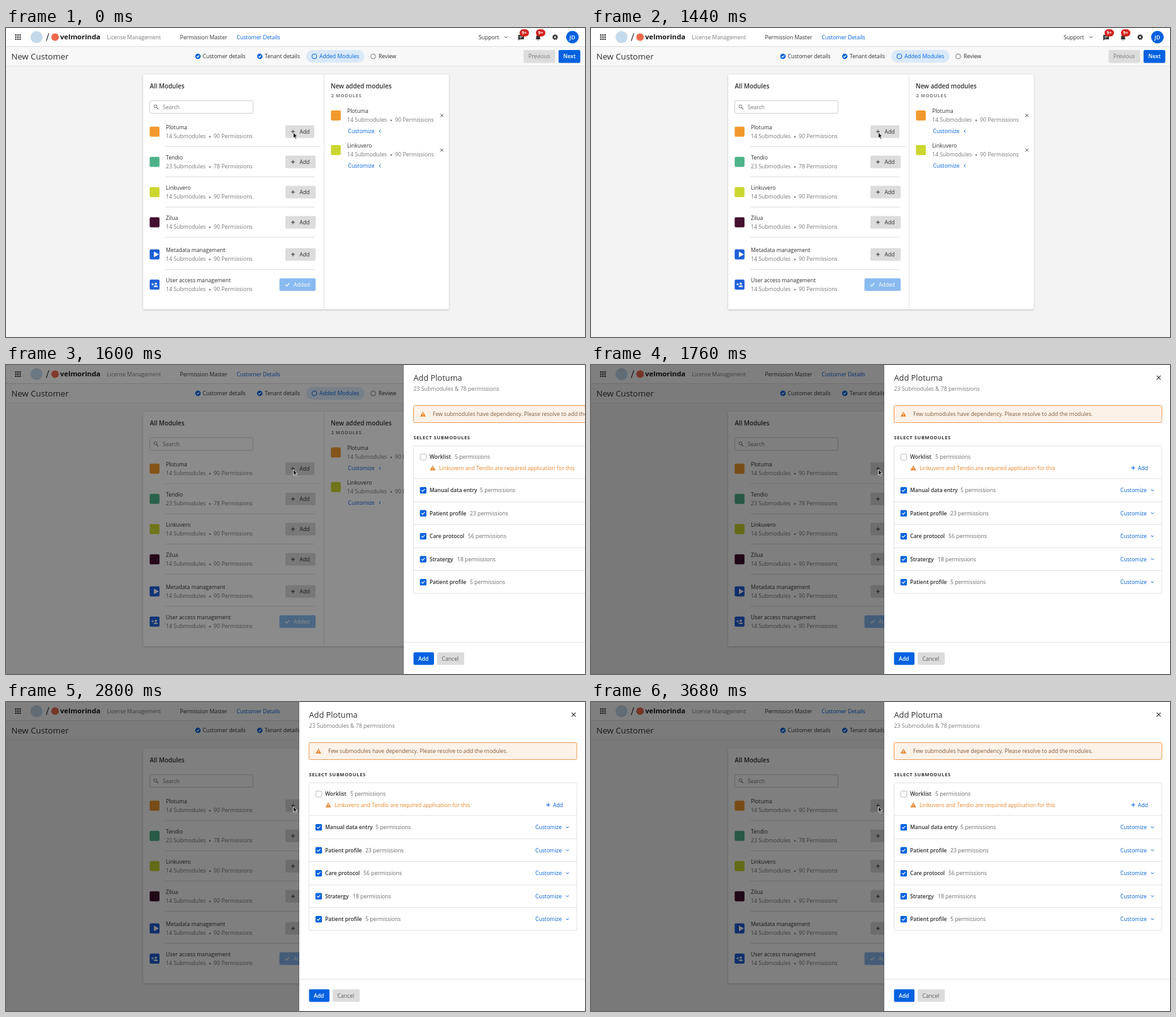
Recreate the animation shown at these times as an HTML page. Size 920 by 491 pixels, loop 3.76 s.

```html
<!DOCTYPE html>
<html lang="en">
<head>
<meta charset="utf-8">
<title>Add module</title>
<style>
  html, body { margin: 0; width: 100%; height: 100%; overflow: hidden; background: #f3f3f3; }
  svg { display: block; width: 920px; height: 491px; font-family: "Open Sans", "Noto Sans", sans-serif; }
  text { white-space: pre; }
</style>
</head>
<body>
<svg id="stage" viewBox="0 0 920 491"></svg>
<script>
const BLUE = '#0061e0', INK = '#2f2f2f', GREY = '#787878', BUTTON = '#dcdcdc', ORANGE = '#e9852d';
const LOOP = 3760, STEP = 80, PANEL_X = 466;

// Shape helpers; text is placed by its vertical centre.
const text = (x, y, str, fill = INK, size = 8.65, weight = 400, extra = '') =>
  `<text x="${x}" y="${y + size * .36}" fill="${fill}" font-size="${size}" font-weight="${weight}" ${extra}>${str}</text>`;
const box = (x, y, w, h, fill, r = 0, extra = '') =>
  `<rect x="${x}" y="${y}" width="${w}" height="${h}" rx="${r}" fill="${fill}" ${extra}/>`;
const dot = (x, y, r, fill, extra = '') => `<circle cx="${x}" cy="${y}" r="${r}" fill="${fill}" ${extra}/>`;
const line = (x, y, d, stroke, width = 1) =>
  `<path transform="translate(${x} ${y})" d="${d}" fill="none" stroke="${stroke}" stroke-width="${width}"/>`;
const solid = (x, y, d, fill, extra = '') => `<path transform="translate(${x} ${y})" d="${d}" fill="${fill}" ${extra}/>`;

const plus = (x, y, c = INK) => line(x, y, 'M-3 0H3M0-3V3', c);
const cross = (x, y, s, width) => line(x, y, `M${-s} ${-s}L${s} ${s}M${s} ${-s}L${-s} ${s}`, INK, width);
const tick = (x, y, s = 1) => line(x, y, `M${-2.6 * s} 0L${-.8 * s} ${1.9 * s}L${2.7 * s} ${-1.9 * s}`, '#fff', 1.2);
const warning = (x, y) => solid(x, y, 'M0-4L4.5 4H-4.5Z', ORANGE) + line(x, y, 'M0-1.4V1.2M0 2V3', '#fff', .9);
const caps = (x, y, str, fill) => text(x, y, str, fill, 7.4, 700, 'letter-spacing=".7"');
const counts = (x, y, subs, perms) =>
  text(x, y, subs + ' Submodules', GREY, 8.75) + dot(x + 70, y + .8, 1.3, GREY) + text(x + 76, y, perms + ' Permissions', GREY, 8.75);

function header() {
  let s = box(0, 0, 920, 30, '#fff') + box(0, 30, 920, 31, '#f8f8f8') +
    box(0, 29, 920, 1, '#dedede') + box(0, 60, 920, 1, '#e4e4e4');
  for (let i = 0; i < 9; i++) s += box(14.5 + i % 3 * 3.4, 10 + (i / 3 | 0) * 3.4, 2.2, 2.2, INK);
  s += dot(48.5, 14.5, 9.5, '#c3d9ec') + line(66, 14.5, 'M-2 6L2-6', INK, 1.2) + dot(78, 14.5, 6, '#ee6a4c') +
    text(86, 14, 'velmorinda', '#161616', 11.2, 700) +
    text(160.5, 14.5, 'License Management', GREY) + text(276.5, 14.5, 'Permission Master') +
    text(366.5, 14.5, 'Customer Details', BLUE) + text(751, 14.5, 'Support') +
    line(794.5, 14.5, 'M-2.2-1.1L0 1.1L2.2-1.1', INK) +
    solid(818.5, 15, 'M-4.5-4H4.5V3H-2.5L-4.5 5Z', INK) + line(818.5, 15, 'M-2.5-1.5H2.5M-2.5 .5H1', '#fff', .8) +
    solid(845.5, 15, 'M-4 3L-3 1.5V-1C-3-5 3-5 3-1V1.5L4 3ZM-1.2 3.7H1.2Q0 5.6-1.2 3.7Z', INK) +
    dot(872.5, 14.5, 2.5, 'none', `stroke="${INK}" stroke-width="2"`) +
    dot(872.5, 14.5, 3.8, 'none', `stroke="${INK}" stroke-width="1.3" stroke-dasharray="1.7 1.28"`);
  for (const x of [823.5, 849.5])
    s += box(x - 7.5, 2, 15, 11.5, '#d5221f', 5.7) + text(x, 7.6, '9+', '#fff', 7, 700, 'text-anchor="middle"');
  s += dot(900, 14.5, 10, BLUE) + text(900, 14.5, 'JD', '#fff', 9, 600, 'text-anchor="middle"');

  s += text(8.5, 45, 'New Customer', INK, 13.2, 500) + box(477, 35, 92.5, 20, '#d9e9fa', 10);
  for (const x of [305, 403.3]) s += dot(x, 45, 4.3, BLUE) + tick(x, 45, .8);
  s += dot(490, 45, 3.9, 'none', `stroke="${BLUE}"`) + dot(583.5, 45, 3.9, 'none', `stroke="${GREY}"`) +
    text(312.5, 45, 'Customer details') + text(411, 45, 'Tenant details') +
    text(498, 45, 'Added Modules', BLUE) + text(592, 45, 'Review') +
    box(822.5, 35, 50, 20.5, BUTTON, 2) + text(830, 45, 'Previous', GREY) +
    box(878, 35, 34.5, 20.5, BLUE, 2) + text(885.5, 45, 'Next', '#fff', 8.65, 600);
  return s;
}

const ROWS = [
  [158, 'Plotuma', '#f2992e', 14, 90], [206, 'Tendio', '#4fb389', 23, 78], [254, 'Linkuvero', '#cbd62f', 14, 90],
  [302, 'Zilua', '#43102f', 14, 90], [353, 'Metadata management', '#1d5fd8', 14, 90],
  [401, 'User access management', '#1d5fd8', 14, 90],
];

function modules() {
  let s = box(218, 74, 485.5, 373, '#fff', 2, 'filter="url(#soft)"') + box(505, 74, 1, 373, '#e2e2e2') +
    text(228.5, 92, 'All Modules', INK, 9.8, 600) +
    box(228.5, 115.5, 164, 20, '#fff', 2, 'stroke="#cfcfcf"') +
    dot(237.5, 124.5, 2.4, 'none', `stroke="${GREY}"`) + line(237.5, 124.5, 'M1.8 1.8L4.5 4.5', GREY, 1.2) +
    text(249, 125.7, 'Search', GREY);
  ROWS.forEach(([y, name, color, subs, perms], i) => {
    const mid = y + 6.8;
    s += box(228.3, mid - 8, 15.6, 16, color, 2) + text(254, y, name) + counts(254, y + 14, subs, perms);
    if (i == 4) s += solid(238, mid, 'M-3-4.5L5 0L-3 4.5Z', '#fff');
    if (i == 5) {
      s += dot(238, mid - 1.6, 1.8, '#fff') + solid(238, mid, 'M-3.5 3.8C-3.5 .3 3.5 .3 3.5 3.8Z', '#fff') +
        line(233, mid - .5, 'M-2 0H2M0-2V2', '#fff') +
        box(434.5, mid - 10, 57.5, 20, '#89baf0', 2) + tick(447, mid, 1.2) + text(457, mid, 'Added', '#fff');
    } else {
      s += box(444, mid - 10, i ? 48 : 46, 20, BUTTON, 2) + plus(456, mid) + text(466.5, mid, 'Add') +
        box(253, y + 30, i ? 237.5 : 247, 1, '#dedede');
    }
  });
  s += text(516, 92, 'New added modules', INK, 9.8, 600) + caps(516.5, 107.5, '2 MODULES', GREY);
  for (const [y, row] of [[132, ROWS[0]], [187, ROWS[2]]])
    s += box(516.3, y - 1, 15.6, 16, row[2], 2) + text(542, y, row[1]) + counts(542, y + 14, 14, 90) +
      cross(692.5, y + 7, 2.4, .9) + text(543.5, y + 32, 'Customize', BLUE, 8.65, 500) +
      line(594, y + 32, 'M1.2-2.2L-1 0L1.2 2.2', BLUE);
  return s;
}

function panel() {
  let s = box(0, 0, 456, 491, '#fff', 0, 'filter="url(#soft)"') +
    text(15.5, 20, 'Add Plotuma', INK, 12.8, 500) + text(15.5, 38, '23 Submodules &amp; 78 permissions', GREY, 8.75) +
    cross(436, 20, 3.2, 1.1) +
    box(15.5, 64.5, 425.5, 27, '#fdf2e8', 2, 'stroke="#eb9a55"') + warning(30.5, 78) +
    text(46, 78, 'Few submodules have dependency. Please resolve to add the modules.', '#805a3a') +
    caps(15.5, 115, 'SELECT SUBMODULES', INK) +
    box(15.5, 128.5, 425.5, 234.5, '#fff', 1, 'stroke="#e2e2e2"');
  const items = [
    [146, 'Worklist', 81, 5], [199, 'Manual data entry', 121, 5], [235.5, 'Patient profile', 105, 23],
    [272, 'Care protocol', 102, 56], [308.5, 'Stratergy', 85, 18], [345, 'Patient profile', 105, 5],
  ];
  items.forEach(([y, name, x, n], i) => {
    s += text(41, y, name, INK, 8.5, 600) + text(x, y, n + ' permissions', '#686868', 8.65, 500);
    if (i) {
      s += box(16, Math.round(y - 19), 425, 1, '#e2e2e2') + box(25.7, y - 5, 10.3, 10.3, BLUE, 1.5) + tick(30.8, y) +
        text(375, y, 'Customize', BLUE, 8.65, 500) + line(426, y, 'M-2.2-1.1L0 1.1L2.2-1.1', BLUE);
    } else {
      s += box(26.2, y - 4.5, 9.5, 9.5, '#fff', 1.5, 'stroke="#bdbdbd"') + warning(46, 163.5) +
        text(56, 163.5, 'Linkuvero and Tendio are required application for this', ORANGE) +
        plus(395.5, 163.5, BLUE) + text(403, 163.5, 'Add', BLUE, 8.65, 500);
    }
  });
  return s + box(0, 440, 456, 1, '#e2e2e2') +
    box(15.5, 456.5, 32.5, 20, BLUE, 2) + text(23, 466.5, 'Add', '#fff', 8.65, 600) +
    box(53, 456.5, 43, 20, BUTTON, 2) + text(60.5, 466.5, 'Cancel', '#5c5c5c');
}

document.getElementById('stage').innerHTML =
  `<defs><filter id="soft" x="-10%" y="-10%" width="120%" height="120%">
    <feDropShadow dx="0" dy="1" stdDeviation="1.6" flood-opacity=".22"/></filter></defs>` +
  box(0, 0, 920, 491, '#f3f3f3') + header() + modules() +
  box(0, 0, 920, 491, '#000', 0, 'id="shade"') +
  solid(456.5, 166, 'M0 0V9L2.1 7.2L3.6 10.4L5.2 9.7L3.7 6.6H6.6Z', '#111', 'stroke="#fff" stroke-width=".8"') +
  `<g id="panel">${panel()}</g>`;

const shade = document.getElementById('shade'), drawer = document.getElementById('panel');
const progress = (t, start, duration) => Math.min(1, Math.max(0, (t - start) / duration));

function render() {
  const t = Math.floor(performance.now() % LOOP / STEP) * STEP;
  const slide = 1 - (1 - progress(t, 1440, 289)) ** 1.25;
  shade.setAttribute('opacity', .5 * progress(t, 1463, 150));
  drawer.setAttribute('transform', `translate(${Math.round(920 - slide * (920 - PANEL_X))} 0)`);
  drawer.setAttribute('visibility', slide ? 'visible' : 'hidden');
  requestAnimationFrame(render);
}
render();
</script>
</body>
</html>
```
